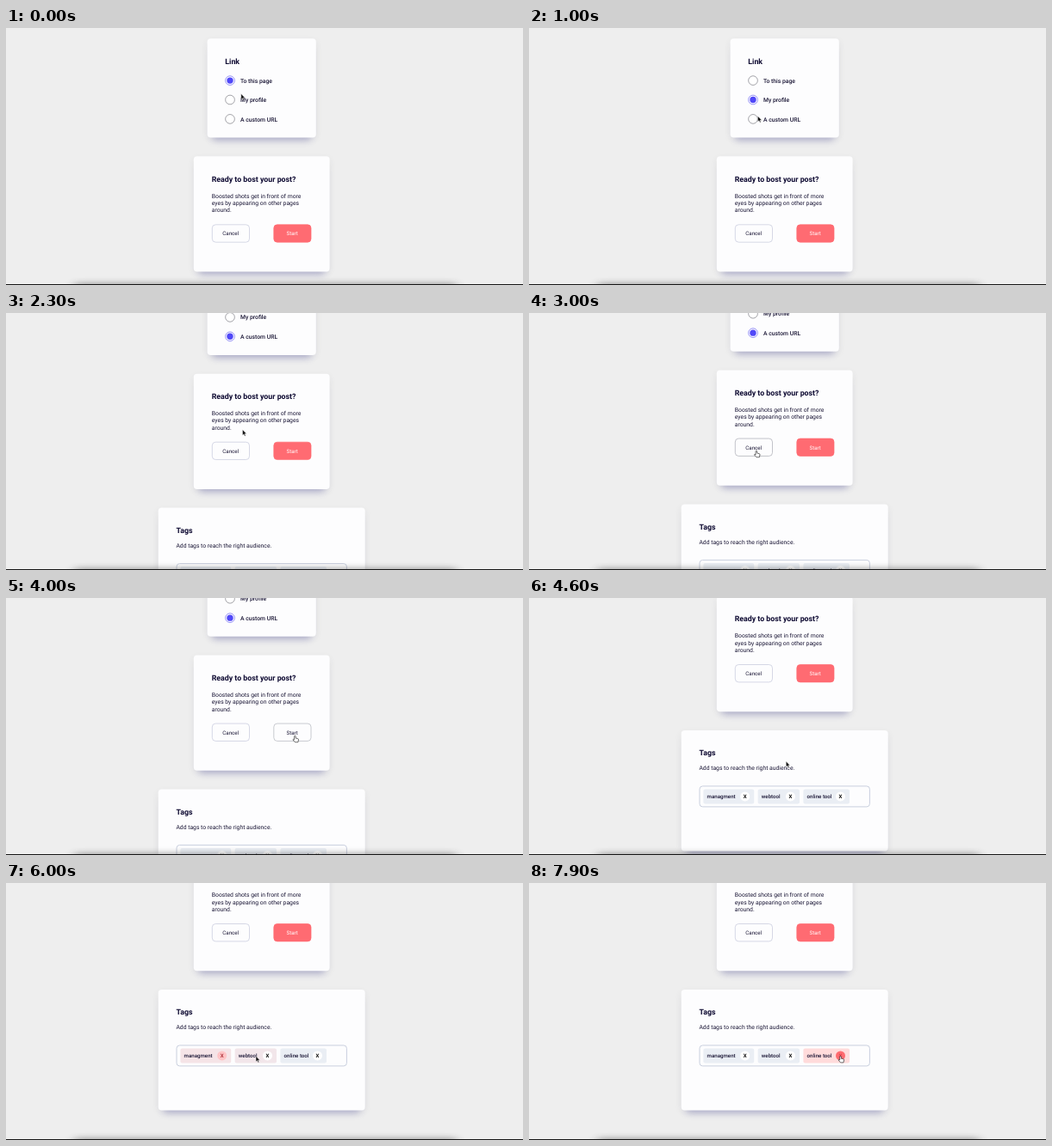
Write an HTML page that moves like this. It is 600 px wide and 299 px high and loops after 8000 ms.

```html
<!DOCTYPE html>
<html lang="en">
<head>
<meta charset="utf-8">
<title>Form cards</title>
<style>
  html, body { margin: 0; width: 100%; height: 100%; overflow: hidden; background: #eee; }
  svg { display: block; width: 100vw; height: 100vh; }
  text { font: 400 6.8px Roboto, "Noto Sans", sans-serif; fill: #1b1736; text-rendering: geometricPrecision; }
  .title { font-size: 8.8px; font-weight: 700; fill: #0c0830; }
  .label { font-weight: 500; }
  .button { font-size: 6.2px; text-anchor: middle; }
  .tag { font-size: 6.15px; font-weight: 500; }
  .close { font-size: 6.1px; font-weight: 700; text-anchor: middle; }
</style>
</head>
<body>
<svg viewBox="0 0 600 299" preserveAspectRatio="none">
  <defs>
    <filter id="soft" x="-20%" y="-50%" width="140%" height="200%"><feGaussianBlur stdDeviation="4"/></filter>
    <filter id="edge" x="-20%" y="-200%" width="140%" height="500%"><feGaussianBlur stdDeviation="6 3"/></filter>
  </defs>
  <rect width="600" height="299" fill="#eee"/>
  <g id="page"></g>
  <rect x="80" y="296.5" width="442" height="12" fill="#333" opacity=".4" filter="url(#edge)"/>
  <rect y="298" width="600" height="1" fill="#151515"/>
  <g id="cursor">
    <path id="arrow" d="M0 0V6.5L1.5 5.2L2.6 7.5L3.6 7L2.6 4.8H4.6Z" fill="#111" stroke="#fff" stroke-width=".4"/>
    <path id="hand" d="M-.8 .8a.8 .8 0 0 1 1.6 0V2.8l2.5 .6q.9 .2 .8 1.1L3.5 7.5H0L-2.5 4.5q.4-.9 1.7 0Z" fill="#fff" stroke="#222" stroke-width=".65" stroke-linejoin="round"/>
  </g>
</svg>
<script>
const LOOP = 8000, FADE = 250, SAMPLES = 25;
const $ = id => document.getElementById(id);
const page = $('page');

function set(node, attrs) {
  for (const key in attrs) node.setAttribute(key, attrs[key]);
}
function add(name, attrs, content) {
  const node = document.createElementNS('http://www.w3.org/2000/svg', name);
  set(node, attrs);
  if (content) node.textContent = content;
  return page.appendChild(node);
}
const box = (x, y, width, height, rx, attrs) => add('rect', { x, y, width, height, rx, ...attrs });
const write = (x, y, kind, content) => add('text', { x, y, class: kind }, content);

function card(x, y, w, h) {
  box(x, y + 3, w, h - 1, 4, { fill: '#223', opacity: .07, filter: 'url(#soft)' });
  box(x + 6, y + 12, w - 12, h - 9, 4, { fill: '#4a4a96', opacity: .37, filter: 'url(#soft)' });
  box(x, y, w, h, 4, { fill: '#fdfdfe' });
}

// Each control keeps its page centre (x, y) and half size (rx, ry).
function radio(content, i) {
  const x = 260, y = 61.1 + i * 22.4;
  const ring = add('circle', { cx: x, cy: y, r: 5.35, fill: '#fff', 'stroke-width': .65 });
  const dot = add('circle', { cx: x, cy: y, fill: '#5048f8' });
  write(272, y + 2.6, 'label', content);
  return { x, y, ring, dot };
}

function button(x, content) {
  const y = 239, rx = 21.6, ry = 10.2;
  const shape = box(x - rx, y - ry, rx * 2, ry * 2, 4, { 'stroke-width': .7 });
  return { x, y, rx, ry, shape, text: write(x - .2, y + 2.3, 'button', content) };
}

function tag(left, width, content) {
  const x = left + width / 2, y = 382.2, cx = left + width - 10.5;
  const shape = box(left, y - 8.5, width, 17, 2);
  write(left + 4.2, y + 2.1, 'tag', content);
  const disc = add('circle', { cx, cy: y, r: 5.5 });
  const mark = write(cx, y + 2.2, 'close', 'X');
  return { x, y, rx: width / 2, ry: 8.5, shape, close: { x: cx, y, rx: 5.5, ry: 5.5, disc, mark } };
}

card(233.6, 12.3, 126.2, 115.3);
write(254.3, 41.8, 'title', 'Link');
const radios = ['To this page', 'My profile', 'A custom URL'].map(radio);

card(217.8, 149.3, 157.8, 134.3);
write(238.7, 178.6, 'title', 'Ready to bost your post?');
['Boosted shots get in front of more', 'eyes by appearing on other pages', 'around.']
  .forEach((line, i) => write(238.8, 197.5 + i * 8.45, 'body', line));
const cancel = button(260.9, 'Cancel');
const start = button(332.4, 'Start');

card(176.7, 305.2, 240, 140.6);
write(197.6, 334.7, 'title', 'Tags');
write(197.4, 351.7, 'body', 'Add tags to reach the right audience.');
box(198, 370.2, 197.4, 24, 3.5, { fill: '#fdfdfe', stroke: '#c3cadb', 'stroke-width': .9 });
const tags = [tag(202.4, 58.8, 'managment'), tag(265.6, 48.4, 'webtool'), tag(318.4, 53.6, 'online tool')];

const clamp = v => Math.max(0, Math.min(1, v));
const smooth = v => v * v * (3 - 2 * v);
const ramp = (t, from, length) => smooth(clamp((t - from) / length));
const blend = (a, b, k) => a + (b - a) * k;

const scrollAt = t => 82.75 * ramp(t, 2020, 325) + 68.55 * ramp(t, 4150, 450) + 30 * ramp(t, 4700, 500);

// The pointer rests at each stop from `at` to `leave` and glides between them.
const rest = (at, stay, x, y) => ({ at, leave: at + stay, x, y });
const visit = (at, stay, target, dx, dy) => rest(at, stay, target.x + dx, target.y + dy - scrollAt(at));
const pickSecond = visit(300, 300, radios[1], 1, 0);
const pickThird = visit(1200, 350, radios[2], 1, 0);
const stops = [
  rest(0, 0, 272.8, 76.5),
  pickSecond,
  rest(1000, 0, 265.5, 102.5),
  pickThird,
  rest(1900, 100, 270, 126),
  rest(2300, 0, 274.5, 135.7),
  visit(2950, 200, cancel, 3, 4),
  visit(3600, 480, start, 3, 4),
  rest(4600, 0, 298.3, 190),
  rest(5200, 300, 256, 190),
  visit(5650, 150, tags[0].close, 0, .5),
  visit(6100, 650, tags[1].close, 0, .5),
  visit(7250, 750, tags[2].close, 0, .5)
];

function cursorAt(t) {
  const i = Math.max(0, stops.findLastIndex(stop => stop.at <= t));
  const a = stops[i], b = stops[i + 1] || a;
  const k = ramp(t, a.leave, b.at - a.leave || 1);
  return { x: blend(a.x, b.x, k), y: blend(a.y, b.y, k) };
}

function isOver(t, { x, y, rx, ry }) {
  const cursor = cursorAt(t);
  return Math.abs(cursor.x - x) < rx && Math.abs(cursor.y + scrollAt(t) - y) < ry;
}

// Share of the last FADE ms spent over the control: a linear fade in and out.
function hover(t, control) {
  let hits = 0;
  for (let i = 0; i < SAMPLES; i++) hits += isOver(t - i * FADE / SAMPLES, control);
  return hits / SAMPLES;
}

function mix(a, b, k) {
  const part = (hex, i) => parseInt(hex.slice(1 + i * 2, 3 + i * 2), 16);
  return `rgb(${[0, 1, 2].map(i => Math.round(blend(part(a, i), part(b, i), k)))})`;
}

function draw(t) {
  set(page, { transform: `translate(0 ${-scrollAt(t)})` });

  const second = ramp(t, pickSecond.at + 200, 200), third = ramp(t, pickThird.at + 200, 200);
  [1 - second, second * (1 - third), third].forEach((on, i) => {
    set(radios[i].ring, { stroke: mix('#74747c', '#625bf2', on) });
    set(radios[i].dot, { r: 3.7 * on, opacity: on });
  });

  const overStart = hover(t, start);
  set(cancel.shape, { fill: '#fdfdfe', stroke: mix('#c5c8dc', '#a9abb3', hover(t, cancel)) });
  set(start.shape, { fill: mix('#ff6b72', '#fdfdfe', overStart), stroke: mix('#ff6b72', '#b4b6be', overStart) });
  start.text.style.fill = mix('#ffffff', '#1b1736', overStart);

  for (const item of tags) {
    const { disc, mark } = item.close, hot = hover(t, item.close);
    set(item.shape, { fill: mix('#eaeef4', '#ffdbdb', hover(t, item)) });
    set(disc, { fill: mix('#ffffff', '#ff6b70', hot) });
    mark.style.fill = mix('#111111', '#d9414b', clamp(hot * 2));
  }

  const { x, y } = cursorAt(t);
  const pointing = [cancel, start, ...tags.map(item => item.close)].some(control => isOver(t, control));
  set($('cursor'), { transform: `translate(${x} ${y})` });
  set($('arrow'), { visibility: pointing ? 'hidden' : 'visible' });
  set($('hand'), { visibility: pointing ? 'visible' : 'hidden' });
}

const begin = performance.now();
function frame() {
  draw((performance.now() - begin) % LOOP);
  requestAnimationFrame(frame);
}
draw(0);
requestAnimationFrame(frame);
</script>
</body>
</html>
```
